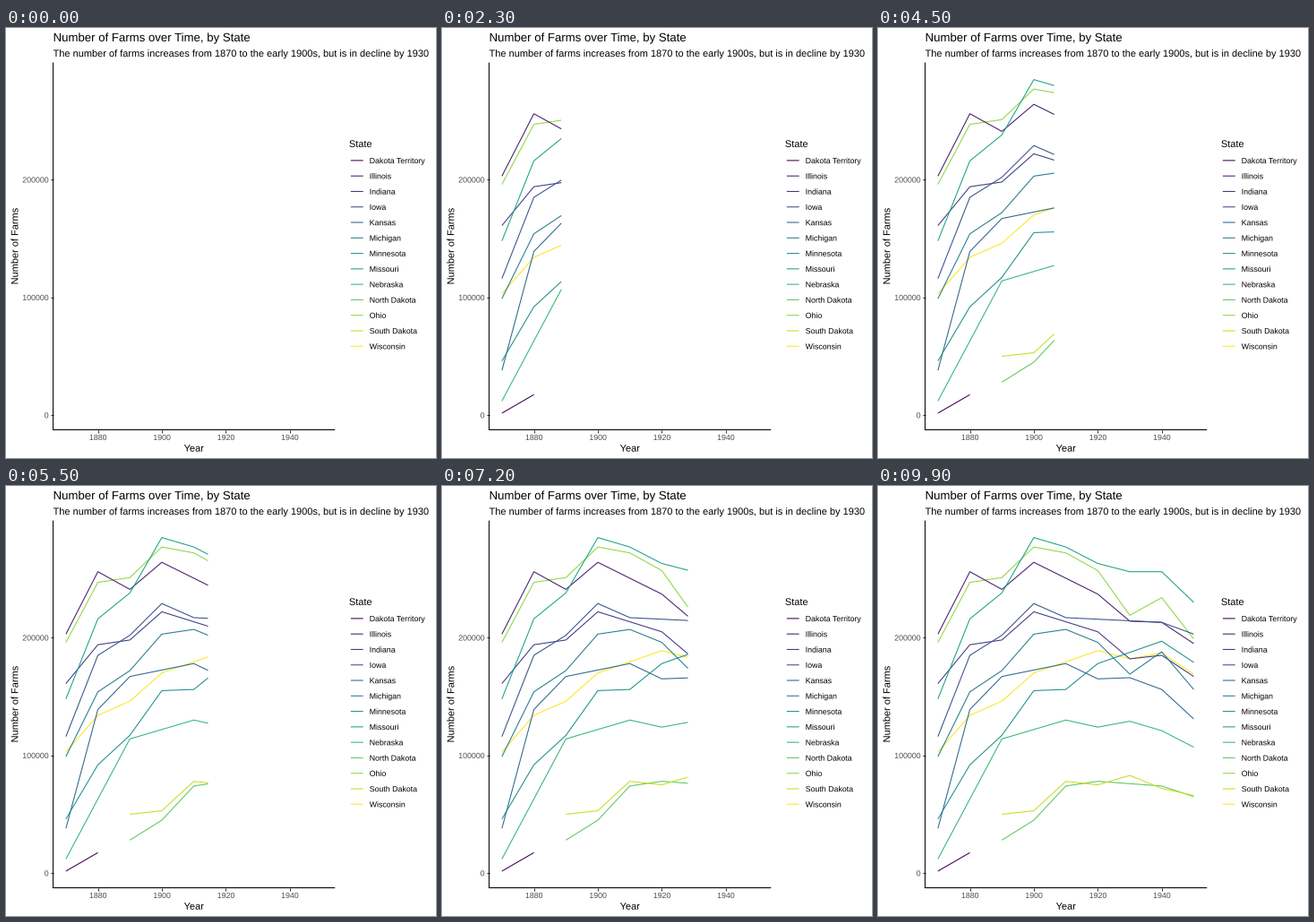
Animation of 480x480 px, one loop 10000 ms. Source, as a matplotlib script:

```python
import numpy as np
import matplotlib.pyplot as plt
from matplotlib.animation import FuncAnimation
from matplotlib.lines import Line2D
from matplotlib.patches import PathPatch
from matplotlib.textpath import TextPath
from matplotlib.transforms import Affine2D

SIZE, DPI = 480, 72  # one point equals one pixel
FRAMES, INTERVAL = 100, 100
LINE = 1.07
GREY = "0.3"
FONT = {"family": "Liberation Sans"}

FIRST, LAST, STEP = 1870, 1950, 10
LOW, HIGH = 1.72, 284.9
LEFT, RIGHT, TOP, BOTTOM = 52.6, 366.7, 39.1, 448.5  # panel edges in pixels

# Thousands of farms per decade at the turning points; gaps are straight
_ = np.nan
FARMS = {
    "Dakota Territory": [1.7, 17.4],
    "Illinois": [203, 256, 241, 264, _, 237, 214, 213, 195],
    "Indiana": [161, 194, 198, 222, _, 205, 182, 185, 167],
    "Iowa": [116, 185, 202, 229, 217, _, _, 213, 203],
    "Kansas": [38, 139, 167, _, 178, 165, 166, 156, 131],
    "Michigan": [99, 154, 172, 203, 207, 196, 169, 188, 156],
    "Minnesota": [46, 92, 117, 155, 156, 178, _, 197, 179],
    "Missouri": [148, 216, 238, 285, 277, 263, 256, 256, 230],
    "Nebraska": [12, _, 114, _, 130, 124, 129, 121, 107],
    "North Dakota": [_, _, 28, 45, 74, 78, _, 74, 65],
    "Ohio": [196, 247, 251, 277, 272, 257, 219, 234, 199],
    "South Dakota": [_, _, 50, 53, 78, 75, 83, 72, 66],
    "Wisconsin": [103, 134, 146, 170, _, 189, 182, 187, 169],
}

fig = plt.figure(figsize=(SIZE / DPI, SIZE / DPI), dpi=DPI, facecolor="white")
ax = fig.add_axes([LEFT / SIZE, 1 - BOTTOM / SIZE,
                   (RIGHT - LEFT) / SIZE, (BOTTOM - TOP) / SIZE])


def padded(lo, hi):
    pad = 0.05 * (hi - lo)
    return lo - pad, hi + pad


def label(x, y, text, size, color="black", align=0, angle=0):
    """Text at a pixel position, y down to the baseline; align 0 left to 1 right."""
    path = TextPath((0, 0), text, size=size, prop=FONT)
    move = (Affine2D().translate(-align * path.get_extents().x1, 0)
            .rotate_deg(angle).translate(x, SIZE - y))
    fig.add_artist(PathPatch(path, fc=color, lw=0, snap=False, transform=move))


def draw_axes():
    ax.set_xlim(*padded(FIRST, LAST))
    ax.set_ylim(*padded(LOW, HIGH))
    ax.set_xticks(range(1880, 1941, 20))
    ax.set_yticks([0, 100, 200])
    ax.tick_params(length=2.74, width=LINE, color="0.2",
                   labelleft=False, labelbottom=False)
    ax.spines[["top", "right"]].set_visible(False)
    for side in ("left", "bottom"):
        ax.spines[side].set(linewidth=LINE, snap=False)
    for tick in ax.get_xticklines() + ax.get_yticklines():
        tick.set_snap(False)

    for year in ax.get_xticks():
        x = np.interp(year, ax.get_xlim(), (LEFT, RIGHT))
        label(x, 460, f"{year:.0f}", 8.8, GREY, align=0.5)
    for count in ax.get_yticks():
        y = np.interp(count, ax.get_ylim(), (BOTTOM, TOP))
        label(47.3, y + 3.2, f"{count * 1000:.0f}", 8.8, GREY, align=1)


def draw_titles():
    label(LEFT, 14.9, "Number of Farms over Time, by State", 13.2)
    label(LEFT, 32, "The number of farms increases from 1870 to the early "
          "1900s, but is in decline by 1930", 11)
    label((LEFT + RIGHT) / 2, 472.7, "Year", 11, align=0.5)
    label(13.4, (TOP + BOTTOM) / 2, "Number of Farms", 11, align=0.5, angle=90)
    label(382.9, 133, "State", 11)


def draw_key(row, state, color):
    y = 147.9 + 17.28 * row
    fig.add_artist(Line2D([384.9 / SIZE, 398.7 / SIZE], [1 - y / SIZE] * 2,
                          lw=LINE, color=color, snap=False,
                          solid_capstyle="butt"))
    label(405.7, y + 3.2, state, 8.8)


def add_curve(row, values, color):
    # Curves stack by their group number read as text: 1, 10, 11, ..., 2, 3
    line, = ax.plot([], [], lw=LINE, color=color, clip_on=False,
                    zorder=3 + float(f"0.{row + 1}"),
                    solid_capstyle="butt", solid_joinstyle="round")
    values = np.array(values)
    years = FIRST + STEP * np.arange(len(values))
    known = ~np.isnan(values)
    return line, years[known], values[known]


draw_axes()
draw_titles()
colors = plt.get_cmap("viridis")(np.linspace(0, 1, len(FARMS)))
curves = []
for row, (state, values) in enumerate(FARMS.items()):
    draw_key(row, state, colors[row])
    curves.append(add_curve(row, values, colors[row]))


def update(frame):
    now = FIRST + (LAST - FIRST) * frame / (FRAMES - 1)
    for line, years, values in curves:
        seen = years <= now
        if not seen.any():
            line.set_data([], [])
            continue
        tip = min(now, years[-1])
        line.set_data(np.append(years[seen], tip),
                      np.append(values[seen], np.interp(tip, years, values)))
    return [line for line, *rest in curves]


anim = FuncAnimation(fig, update, frames=FRAMES, interval=INTERVAL,
                     repeat=True, repeat_delay=0, blit=False)
plt.show()
```
